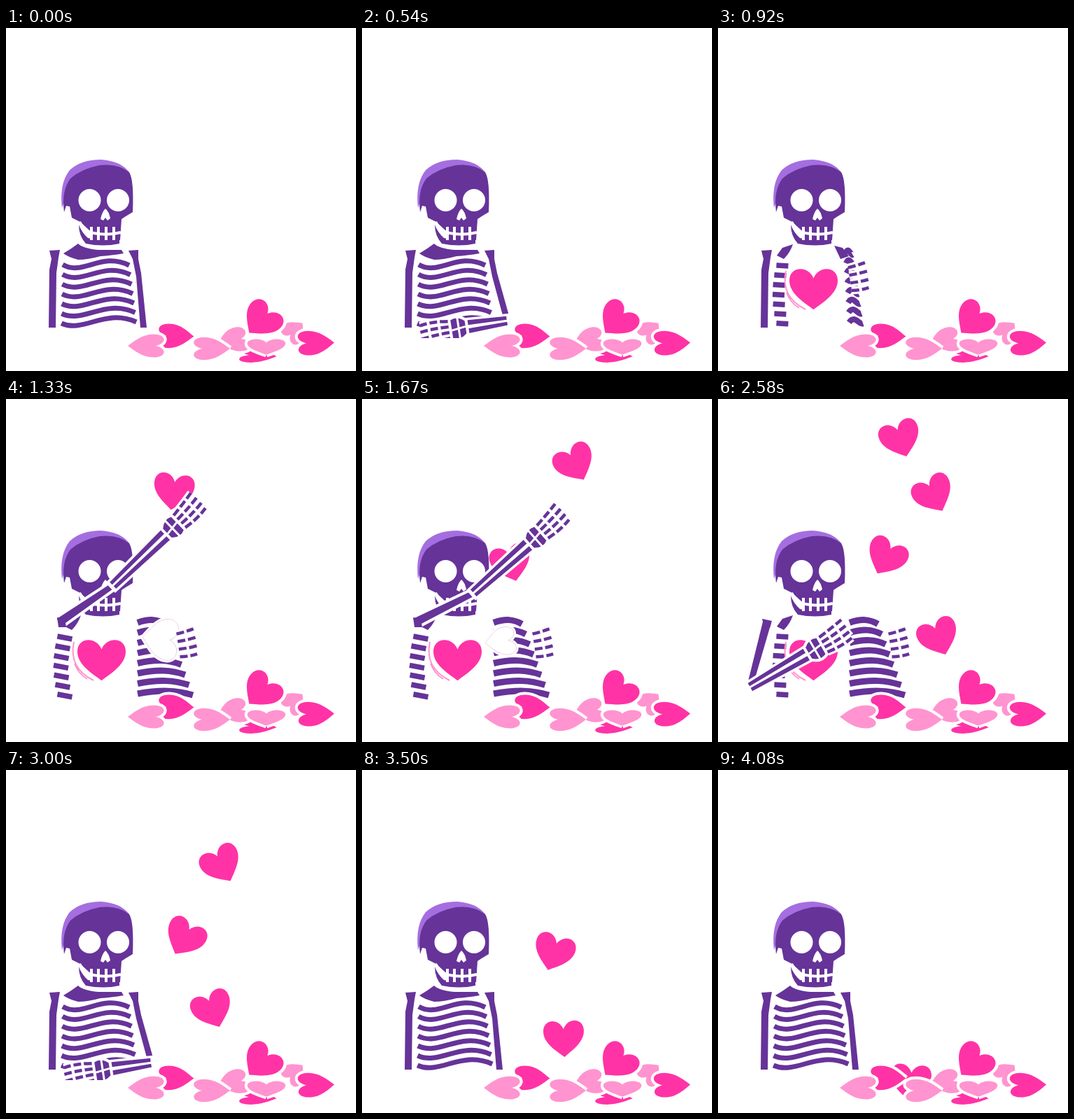
An HTML page with a canvas that plays this animation: 500 by 490 pixels, repeating every 4120 ms.

```html
<!DOCTYPE html>
<html lang="en">
<head>
<meta charset="utf-8">
<title>Skeleton tossing hearts</title>
<style>
html, body { margin: 0; width: 100%; height: 100%; overflow: hidden; background: #fff; }
canvas { display: block; }
</style>
</head>
<body>
<canvas id="stage" width="500" height="490"></canvas>
<script>
const ctx = document.getElementById('stage').getContext('2d');
const PURPLE = '#663399', LILAC = '#a56ee0', PINK = '#ff33a6', ROSE = '#ff94d0', WHITE = '#fff';
const LOOP = 4120;
const THROWS = [0, 413, 781, 1205];
const DRIFT = [10, -10, 0, 0];

const clamp = v => Math.max(0, Math.min(1, v));
const mix = (a, b, k) => a + (b - a) * k;

// Keys are [time, ...values]
function linear(keys, t) {
  let i = 0;
  while (i < keys.length - 2 && t > keys[i + 1][0]) i++;
  const a = keys[i], b = keys[i + 1], k = clamp((t - a[0]) / (b[0] - a[0]));
  return a.slice(1).map((v, j) => mix(v, b[j + 1], k));
}

function smooth(keys, t) {
  let i = 0;
  while (i < keys.length - 2 && t > keys[i + 1][0]) i++;
  const a = keys[i], b = keys[i + 1], span = b[0] - a[0], k = clamp((t - a[0]) / span);
  const p = keys[Math.max(0, i - 1)], n = keys[Math.min(keys.length - 1, i + 2)];
  return a.slice(1).map((v, j) => {
    const w = b[j + 1];
    const m = (w - p[j + 1]) / (b[0] - p[0]) * span;
    const q = (n[j + 1] - v) / (n[0] - a[0]) * span;
    return v + k * (m + k * (3 * (w - v) - 2 * m - q + k * (2 * (v - w) + m + q)));
  });
}

const FLIGHT = [
  [1110, 137, 372, 0], [1219, 197, 281, -25], [1330, 239, 133, 8], [1380, 262, 53, -20],
  [1460, 280, 38, -24], [1587, 298, 63, -26], [1797, 308, 135, -28], [2000, 296, 175, 0],
  [2170, 240, 226, 28], [2219, 255, 239, 30], [2400, 295, 289, 0], [2585, 305, 341, -22],
  [2740, 286, 390, 0], [2880, 275, 447, 5], [2960, 275, 472, 5]
];

// Arm poses: elbow x, y, wrist x, y
const REST = [66, 428, 66, 500], CHEST = [45, 412, 128, 364], BACK = [14, 392, 95, 352];
const SWING = [170, 297, 255, 232], HIGH = [152, 267, 229, 193];
const LEFT = [[0, ...REST], [940, ...REST]];
for (const d of THROWS) {
  LEFT.push([d + 1110, ...CHEST], [d + 1165, ...BACK], [d + 1219, ...SWING],
    [d + 1280, ...HIGH], [d + 1332, ...HIGH], [d + 1375, ...CHEST]);
}
LEFT.push([2680, ...CHEST], [2900, ...REST]);

const LOW = [197, 428, 150, 500], HOLD = [208, 418, 150, 427];
const RIGHT = [[80, ...LOW], [520, ...HOLD], [720, ...HOLD], [860, 212, 410, 190, 400],
  [2860, 212, 410, 190, 400], [2960, ...HOLD], [3020, ...HOLD], [3260, ...LOW]];

function stroke(color, width) {
  ctx.strokeStyle = color;
  ctx.lineWidth = width;
  ctx.stroke();
}

function line(x1, y1, x2, y2, color, width) {
  ctx.beginPath();
  ctx.moveTo(x1, y1);
  ctx.lineTo(x2, y2);
  stroke(color, width);
}

function shape(d, color, halo = 0) {
  const p = new Path2D(d);
  if (halo) {
    ctx.strokeStyle = WHITE;
    ctx.lineWidth = halo;
    ctx.stroke(p);
  }
  ctx.fillStyle = color;
  ctx.fill(p);
}

function heart(x, y, deg, sx, sy, color, halo = 0, edge = WHITE) {
  ctx.save();
  ctx.translate(x, y);
  ctx.scale(sx, sy);
  ctx.rotate(deg * Math.PI / 180);
  ctx.beginPath();
  ctx.moveTo(0, 27);
  ctx.bezierCurveTo(-11, 18, -29, 7, -29, -10);
  ctx.bezierCurveTo(-29, -28, -7, -30, 0, -13);
  ctx.bezierCurveTo(7, -30, 29, -28, 29, -10);
  ctx.bezierCurveTo(29, 7, 11, 18, 0, 27);
  ctx.restore();
  if (halo) stroke(edge, halo);
  ctx.fillStyle = color;
  ctx.fill();
}

// Tapered bone from one joint to the next
function bone(x1, y1, x2, y2, w1, w2, halo = 8) {
  const a = Math.atan2(y2 - y1, x2 - x1), nx = -Math.sin(a) / 2, ny = Math.cos(a) / 2;
  shape(`M${x1 + nx * w1} ${y1 + ny * w1}L${x2 + nx * w2} ${y2 + ny * w2}` +
    `L${x2 - nx * w2} ${y2 - ny * w2}L${x1 - nx * w1} ${y1 - ny * w1}Z`, PURPLE, halo);
}

function fingers(length, gap, spread, bend) {
  const strokeAll = (color, width) => {
    for (let k = -1.5; k < 2; k++) {
      const reach = length - Math.abs(k) * 4, y = k * (gap + spread);
      ctx.beginPath();
      ctx.moveTo(0, k * gap);
      ctx.quadraticCurveTo(reach * .55, y + bend * .1, reach, y - bend);
      stroke(color, width);
    }
  };
  strokeAll(WHITE, 11);
  ctx.setLineDash([11, 4]);
  strokeAll(PURPLE, 4.5);
  ctx.setLineDash([]);
}

function forearm(ex, ey, wx, wy) {
  const length = Math.hypot(wx - ex, wy - ey);
  ctx.save();
  ctx.translate(ex, ey);
  ctx.rotate(Math.atan2(wy - ey, wx - ex));
  shape(`M0 -6L${length} -9V9L0 6Z`, WHITE, 8);
  bone(1, -4, length, -6, 5, 7, 0);
  bone(1, 4, length, 6, 5, 7, 0);
  ctx.translate(length, 0);
  shape('M2 -9Q12 -18 22 -13V13Q12 18 2 9Z', PURPLE, 8);
  line(12, -18, 12, 18, WHITE, 3);
  line(2, 1, 24, -2, WHITE, 3);
  ctx.translate(26, 0);
  fingers(46, 8, 2, 3);
  ctx.restore();
}

function clipAbove(y, draw) {
  ctx.save();
  ctx.beginPath();
  ctx.rect(0, 0, 500, y);
  ctx.clip();
  draw();
  ctx.restore();
}

function leftArm(t) {
  const [ex, ey, wx, wy] = linear(LEFT, t);
  const raised = ey < 380;
  clipAbove(429, () => {
    if (ey > 426) {
      shape('M62 318L77 317L75 328L72 350L71 428H61L62 345L65 330Z', PURPLE);
    } else {
      bone(raised ? 76 : 70, 319, ex, ey, 12, 8);
      shape(raised ? 'M73 312L84 314L86 326L75 326Z' : 'M63 314L77 317L74 327L66 326Z', PURPLE);
    }
    if (wy < 450) forearm(ex, ey, wx, wy);
  });
}

function rightArm(t) {
  const [ex, ey, wx, wy] = linear(RIGHT, t);
  clipAbove(443, () => {
    shape(`M175 318L189 317L189 330L193 350L${ex + 4} ${ey}H${ex - 5}L186 355L181 330Z`, PURPLE);
    if (wy < 470) forearm(ex, ey, wx, wy);
  });
}

function skull() {
  shape('M80 257Q76 222 91 203Q107 188 136 188Q164 190 176 206L168 230H90Z', LILAC);
  shape('M83 263Q79 232 92 215Q108 201 134 196Q160 193 176 206Q183 217 181 263' +
    'L171 269L165 273L163 303H124L118 288L106 277L94 271L91 255L86 254Z', PURPLE);
  shape('M104 281Q108 292 117 300Q140 306 162 299V308Q139 313 114 308Q104 297 104 281Z', PURPLE);
  for (const x of [119.5, 160]) {
    ctx.beginPath();
    ctx.arc(x, 246, 16, 0, 7);
    ctx.fillStyle = WHITE;
    ctx.fill();
  }
  shape('M142 258Q137 263 135 273L139 275L142 271L145 275L149 272Q147 262 142 258Z', WHITE);
  ctx.beginPath();
  ctx.moveTo(105, 277);
  ctx.quadraticCurveTo(112, 291, 125, 293);
  ctx.quadraticCurveTo(145, 297, 164, 292);
  stroke(WHITE, 4);
  for (const x of [122, 132, 143, 154]) line(x, 284, x, 303, WHITE, 4);
}

function ribs(open, swing) {
  for (let k = swing > 0 ? -1 : 0; k < 7; k++) {
    const x = mix(176 + 1.7 * k, 188, open), y = mix(339 + 13.5 * k, 334 + 14.5 * k, open);
    const width = swing * (swing > 0 ? 46 + 5.5 * k : 95 + 2 * k);
    const endY = mix(338 + 14 * k, y + 2, open);
    ctx.beginPath();
    ctx.moveTo(x, y);
    ctx.bezierCurveTo(x + width * .42, y + mix(-20, -6, open),
      x + width * .7, y + mix(16, -5, open), x + width, endY);
    stroke(PURPLE, mix(7, 9, open));
  }
}

function torso(t) {
  const open = clamp((t - 700) / 380) * (1 - clamp((t - 2700) / 260));
  const swing = -Math.cos(Math.PI * open);
  const raised = linear(LEFT, t)[1] < 380;
  if (open < .1) {
    shape('M82 322Q94 315 103 308Q110 315 132 317H165L168 322Q150 325 135 326Q117 331 103 331Q88 327 82 322Z', PURPLE);
  } else {
    shape('M84 325L92 314L107 309Q103 321 94 330Z', PURPLE);
    if (swing < .5) shape('M166 311L178 314L187 326L175 330Z', PURPLE);
    for (let k = 0; k < 7; k++) {
      const x = (raised ? 68 : 78) + (k - 3) ** 2 * .6, y = 339 + 13.8 * k;
      line(x, y, x + (raised ? 21 : 17), y + (raised ? 4 : 1), PURPLE, 7.5);
    }
    ctx.beginPath();
    ctx.moveTo(97, 347);
    ctx.bezierCurveTo(92, 370, 99, 389, 125, 402);
    ctx.moveTo(98, 378);
    ctx.quadraticCurveTo(103, 392, 116, 400);
    stroke(ROSE, 2);
    heart(136.5, 372, 0, 1.19, 1.12, PINK, 7);
  }
  ribs(open, swing);
  return { open, swing };
}

function pile() {
  heart(360, 468, -82, 1, .36, PINK, 8);
  heart(325, 446, 75, .85, .6, ROSE, 8);
  heart(242, 440, -88, .98, .6, PINK, 8);
  heart(201, 454, 90, 1, .57, ROSE, 8);
  heart(293, 458, -90, 1, .56, ROSE, 8);
  heart(412, 433, -135, .6, .6, ROSE, 8);
  heart(442, 450, -92, 1, .6, PINK, 8);
  heart(365, 417, 42, .97, .92, PINK, 9);
  heart(372, 455, 0, .94, .43, ROSE, 8);
}

function draw(t) {
  ctx.fillStyle = WHITE;
  ctx.fillRect(0, 0, 500, 490);
  skull();
  const { open, swing } = torso(t);
  if (open < .2) rightArm(t);

  for (const d of THROWS) {
    const age = t - d;
    if (age > 1150 && age < 1360) {
      const k = (age - 1219) / 111;
      const pose = [mix(186, 221, k), mix(348, 343, k), mix(75, 95, k), mix(.74, .95, k), mix(.5, 1, k)];
      heart(...pose, WHITE, 7);
      heart(...pose, WHITE, 1, '#d9a9bd');
    }
  }
  if (open >= .2) {
    ctx.save();
    ctx.translate(mix(188, 246, Math.max(0, (swing - .25) / .75)), mix(361, 352, clamp(swing)));
    ctx.rotate(-.15);
    fingers(31, 11, 1, 2);
    ctx.restore();
  }

  THROWS.forEach((d, i) => {
    const age = t - d;
    if (age < 1120 || age > 2950) return;
    const [x, y, deg] = smooth(FLIGHT, age);
    heart(x + DRIFT[i] * clamp((age - 2250) / 330), y, deg, 1, 1, PINK);
  });
  leftArm(t);
  pile();
}

const start = performance.now();
function tick() {
  draw((performance.now() - start) % LOOP);
  requestAnimationFrame(tick);
}
tick();
</script>
</body>
</html>
```
